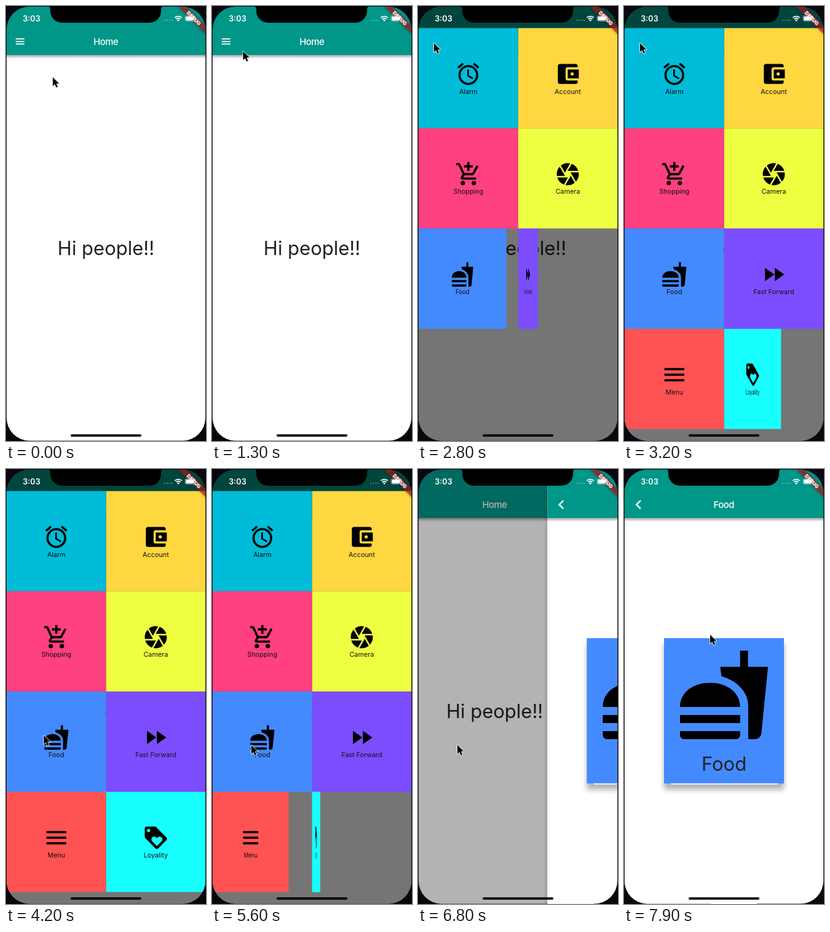
Write an HTML page that moves like this. It is 325 by 702 pixels and loops after 8000 ms.

```html
<!DOCTYPE html>
<html lang="en">
<head>
<meta charset="utf-8">
<title>Folding tile menu</title>
<style>
  html, body { margin: 0; width: 100%; height: 100%; overflow: hidden; background: #08080e; }
  svg { display: block; width: 325px; height: 702px; }
  text { font-family: Inter, Roboto, "Open Sans", sans-serif; text-anchor: middle; }
  .title { font-size: 14.8px; font-weight: 500; letter-spacing: -.45px; fill: #fff; }
  .big { font-size: 31px; fill: #222; }
  .label { font-size: 10.8px; fill: #111; }
  .clock { font-size: 12.6px; font-weight: 600; fill: #fff; }
  .debug { font-size: 8.2px; font-weight: 900; fill: #fff; }
  .line { fill: none; stroke: #000; stroke-width: 2; }
  .white { stroke: #fff; }
  .card { filter: drop-shadow(0 10px 4px rgba(0, 0, 0, .3)); }
  .banner { filter: drop-shadow(0 0 2px rgba(0, 0, 0, .5)); }
</style>
</head>
<body>
<svg id="stage" viewBox="0 0 325 702"></svg>
<script>
const LOOP = 8000;
const TILE = 161.6;
const OPEN = 1970, CLOSE = 5390, STAGGER = 157, FOLD = 230;
const PUSH = 6747, SLIDE = 400, WIDTH = 323;

// Icons are drawn on a 24 unit grid.
const blades = [0, 60, 120, 180, 240, 300].map(a =>
  `<path transform="rotate(${a} 12 12)" d="M11.88 9h9.66A10 10 0 0 0 15.54 2.66Z"/>`).join('');
const icons = {
  alarm: `<g class="line"><circle cx="12" cy="13" r="8"/>
    <path d="M2.65 6.5 7.25 2.6M16.75 2.6l4.6 3.9"/>
    <path stroke-width="1.5" d="M11.75 8v5.6l4.4 2.65"/></g>`,
  wallet: `<path d="M21 18v1a2 2 0 0 1-2 2H5a2 2 0 0 1-2-2V5a2 2 0 0 1 2-2h14a2 2 0 0 1 2 2v1h-9a2 2 0 0 0-2 2v8a2 2 0 0 0 2 2Z"/>
    <path fill-rule="evenodd" d="M12 8h10v8H12ZM14.5 12a1.5 1.5 0 0 0 3 0a1.5 1.5 0 0 0-3 0Z"/>`,
  cart: `<path class="line" d="M12 1v8M8 5h8M1 3h2.64l4.24 9h7.67q.6 0 .9-.5L20.3 4.5M7.7 12.3l-1.6 2.9q-.2.8.9.8h12"/>
    <circle cx="7" cy="20" r="2"/><circle cx="17" cy="20" r="2"/>`,
  camera: blades,
  food: `<path d="M18.06 23h1.66c.84 0 1.53-.64 1.63-1.46L23 5.05h-5V1h-1.97v4.05h-4.97l.3 2.34c1.71.47 3.31 1.32 4.27 2.26 1.44 1.42 2.43 2.89 2.43 5.29Z"/>
    <path d="M16.03 15c0-8-15.03-8-15.03 0ZM1 17h15.03v2H1ZM1 21h15.03v1a1 1 0 0 1-1 1H2a1 1 0 0 1-1-1Z"/>`,
  forward: `<path d="M4 18l8.5-6L4 6ZM13 6v12l8.5-6Z"/>`,
  menu: `<path class="line" d="M3 7h18M3 12h18M3 17h18"/>`,
  tag: `<path fill-rule="evenodd" d="M21.41 11.58l-9-9A2 2 0 0 0 11 2H4a2 2 0 0 0-2 2v7a2 2 0 0 0 .59 1.42l9 9a2 2 0 0 0 2.82 0l7-7a2 2 0 0 0 0-2.84Z
    M4 5.5a1.5 1.5 0 0 0 3 0a1.5 1.5 0 0 0-3 0Z
    M17.27 15.27L13 19.54l-4.27-4.27a2.5 2.5 0 0 1 3.54-3.53l.73.72.73-.73a2.5 2.5 0 0 1 3.54 3.54Z"/>`
};

const icon = (name, cx, cy, size) =>
  `<g transform="translate(${cx - size / 2} ${cy - size / 2}) scale(${size / 24})">${icons[name]}</g>`;
const text = (cls, x, y, str) => `<text class="${cls}" x="${x}" y="${y}">${str}</text>`;

const page = (id, title, lead, body) => `<g id="${id}">
  <rect x="-6" width="7" height="702" fill="url(#edge)"/>
  <rect x="1" width="${WIDTH}" height="702" fill="#fff"/>
  ${body}
  <rect x="1" y="79" width="${WIDTH}" height="6" fill="url(#drop)"/>
  <rect x="1" width="${WIDTH}" height="79" fill="#009688"/>
  ${lead}${text('title', 162.3, 63, title)}</g>`;

const tiles = [
  ['Alarm', 'alarm', '#00bcd8'], ['Account', 'wallet', '#ffd740'],
  ['Shopping', 'cart', '#ff4081'], ['Camera', 'camera', '#eeff41'],
  ['Food', 'food', '#448aff'], ['Fast Forward', 'forward', '#7c4dff'],
  ['Menu', 'menu', '#ff5252'], ['Loyality', 'tag', '#18ffff']
];
const tile = ([label, name, color], i) =>
  `<g transform="translate(${1 + i % 2 * TILE} ${35.4 + (i >> 1) * 161.8})"><g class="tile">
  <rect width="${TILE}" height="162" fill="${color}"/>
  ${icon(name, TILE / 2, 74.2, 43)}${text('label', TILE / 2, 106.2, label)}</g></g>`;

const burger = `<path class="line white" stroke-width="1.7" style="stroke-width:1.7" d="M15.8 53.2h14M15.8 57.3h14M15.8 61.4h14"/>`;
const back = `<path class="line white" style="stroke-width:2.5" d="M27 50.8l-6.8 6.7 6.8 6.7"/>`;
const card = `<rect class="card" x="65" y="273" width="195" height="234.5" fill="#448aff"/>
  <rect x="76" y="507.5" width="174" height="1.6" fill="#fff"/>
  ${icon('food', 162.5, 364.5, 156)}${text('big', 162.5, 486.5, 'Food')}`;

const status = `${text('clock', 41.5, 25, '3:03')}
  <g fill="#fff" opacity=".4">${[258, 262.2, 266.4, 270].map(x => `<circle cx="${x}" cy="23" r="1.1"/>`).join('')}</g>
  <g class="line white" style="stroke-width:1.9">
    <path d="M274.3 18.9a8.2 8.2 0 0 1 11.4 0M276.7 21.3a5 5 0 0 1 6.6 0"/></g>
  <path fill="#fff" d="M280 25l-2-2a3 3 0 0 1 4 0Z"/>
  <rect x="290.8" y="15.6" width="17" height="9" rx="2.6" fill="none" stroke="#fff" stroke-opacity=".4"/>
  <rect x="292" y="16.8" width="13" height="6.6" rx="1.6" fill="#fff"/>`;

const stage = document.getElementById('stage');
stage.innerHTML = `
  <defs>
    <clipPath id="screen"><rect x="1" y="1" width="${WIDTH}" height="700.5" rx="37"/></clipPath>
    <linearGradient id="drop" x2="0" y2="1"><stop stop-color="#000" stop-opacity=".36"/>
      <stop offset="1" stop-color="#000" stop-opacity="0"/></linearGradient>
    <linearGradient id="edge"><stop stop-color="#000" stop-opacity="0"/>
      <stop offset="1" stop-color="#000" stop-opacity=".1"/></linearGradient>
  </defs>
  <rect width="325" height="702" fill="#08080e"/>
  <g clip-path="url(#screen)">
    ${page('home', 'Home', burger, text('big', 162.5, 402, 'Hi people!!'))}
    <rect id="shade" width="325" height="702" fill="#000"/>
    ${tiles.map(tile).join('')}
    ${page('detail', 'Food', back, card)}
    <g transform="translate(305.3 19.7) rotate(45)">
      <rect class="banner" x="-36" y="-4.7" width="72" height="9.4" fill="#b71c1c" fill-opacity=".63"/>
      ${text('debug', 0, 3, 'DEBUG')}</g>
    ${status}
    <path d="M67 0a5 5 0 0 1 5 5v3a19 19 0 0 0 19 19h142a19 19 0 0 0 19-19v-3a5 5 0 0 1 5-5Z"/>
    <rect x="105" y="691.2" width="115" height="3.8" rx="1.9"/>
  </g>
  <g id="cursor"><path d="M0 0v14.3l3.3-3.1 2.3 5.3 2.5-1.1-2.3-5.1h4.5Z"
    stroke="#fff" stroke-width="1.6" paint-order="stroke" stroke-linejoin="round"/></g>`;

// Steps are [ms, value, easing]; the first and last values hold to the loop ends.
function play(el, prop, steps) {
  const all = [[0, steps[0][1]], ...steps, [LOOP, steps[steps.length - 1][1]]];
  el.animate(
    all.map(([ms, value, easing = 'linear']) => ({ offset: ms / LOOP, [prop]: value, easing })),
    { duration: LOOP, iterations: Infinity }
  );
}
const find = id => document.getElementById(id);
const shift = (x, y = 0) => `translate(${x}px, ${y}px)`;

document.querySelectorAll('.tile').forEach((el, i) => {
  const start = OPEN + i * STAGGER;
  const end = CLOSE + (tiles.length - 1 - i) * STAGGER;
  play(el, 'transform', [
    [start, 'scaleX(0)'], [start + FOLD, 'scaleX(1)'],
    [end, 'scaleX(1)'], [end + FOLD, 'scaleX(0)']
  ]);
});

play(find('shade'), 'opacity', [[1880, 0], [2080, .54], [6720, .54], [6900, 0]]);

const glide = 'cubic-bezier(.35, .91, .33, .97)';
play(find('home'), 'transform', [[PUSH, shift(0), glide], [PUSH + SLIDE, shift(-WIDTH / 3)]]);
play(find('detail'), 'transform', [
  [PUSH, shift(400)], [PUSH, shift(WIDTH), glide], [PUSH + SLIDE, shift(0)]
]);

const ease = 'ease-in-out';
play(find('cursor'), 'transform', [
  [300, shift(76, 115), ease], [1200, shift(50.5, 73)], [1300, shift(50.5, 73), ease],
  [1700, shift(26, 60)], [3200, shift(26, 60), ease],
  [4100, shift(61.5, 430)], [4500, shift(61.5, 430), ease],
  [5000, shift(64, 445.5)], [7150, shift(64, 445.5), ease], [7850, shift(140, 267.5)]
]);
</script>
</body>
</html>
```
